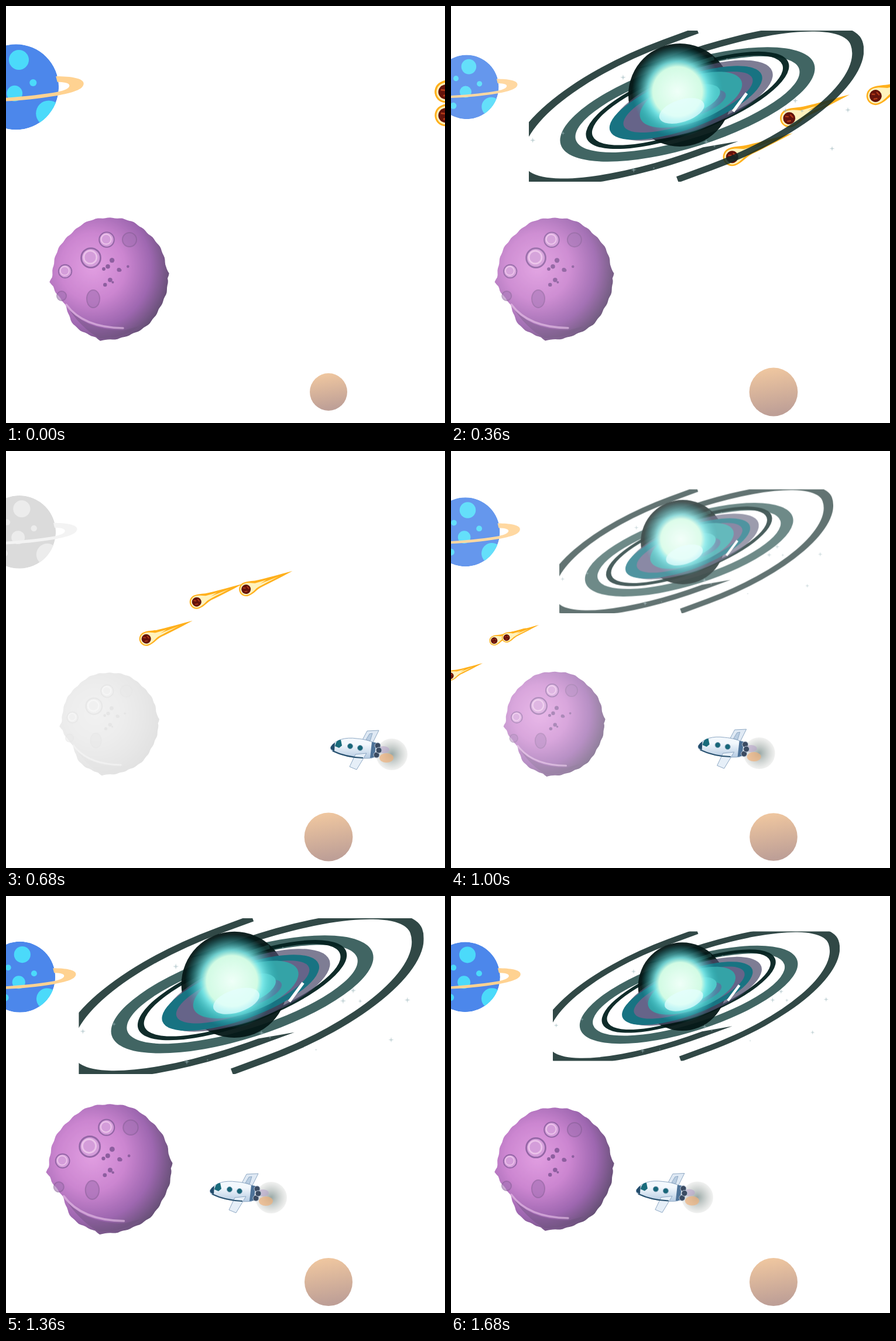
Animation of 750x712 px, one loop 1720 ms. Source, as an HTML page:

```html
<!DOCTYPE html>
<html lang="en">
<head>
<meta charset="utf-8">
<title>Space</title>
<style>
  html, body { margin: 0; width: 100%; height: 100%; overflow: hidden; background: #fff; }
  svg { display: block; width: 750px; height: 712px; }
</style>
</head>
<body>
<svg viewBox="0 0 750 712">
  <defs>
    <radialGradient id="violet" cx=".36" cy=".4" r=".68">
      <stop offset="0" stop-color="#d982d9"/><stop offset=".4" stop-color="#bd62c3"/>
      <stop offset=".72" stop-color="#813a99"/><stop offset="1" stop-color="#301844"/>
    </radialGradient>
    <linearGradient id="sand" x1="0" y1="0" x2=".15" y2="1">
      <stop offset="0" stop-color="#eaa35c"/><stop offset="1" stop-color="#8f5a4b"/>
    </linearGradient>
    <radialGradient id="glow">
      <stop offset="0" stop-color="#effff8"/><stop offset=".54" stop-color="#d2fbe4"/>
      <stop offset=".66" stop-color="#7fecec" stop-opacity=".85"/>
      <stop offset="1" stop-color="#29b5bd" stop-opacity="0"/>
    </radialGradient>
    <radialGradient id="smoke">
      <stop offset="0" stop-color="#536e6b" stop-opacity=".6"/>
      <stop offset="1" stop-color="#8a8f88" stop-opacity=".12"/>
    </radialGradient>
    <linearGradient id="hull" x1="0" y1="0" x2="0" y2="1">
      <stop offset=".3" stop-color="#f3f8fd"/><stop offset="1" stop-color="#b5cbe2"/>
    </linearGradient>
    <clipPath id="globe"><circle r="60"/></clipPath>
    <clipPath id="crop"><rect x="-286" y="-129" width="572" height="258"/></clipPath>
    <g id="comet" transform="rotate(-21.4)">
      <path fill="#ffb01c" d="M85 0C60 3 40 5 26 6C16 7 10 12 0 12A12 12 0 0 1 0-12C10-12 16-8 26-7C40-5 60-3 85 0Z"/>
      <path fill="#fff2bd" d="M60 0C40 2 24 3 17 5C10 8 6 10 0 10A10 10 0 0 1 0-10C6-10 12-7 18-4L38-2L26 0Z"/>
      <circle r="8" fill="#64130b"/>
      <path fill="none" stroke="#b23a18" stroke-width="1.8" d="M-4-4L0-2M3-4L5 1M-4 3L1 4"/>
    </g>
    <g id="crater">
      <circle r="15" fill="#c880cf" stroke="#74398c" stroke-width="2.5"/>
      <circle cx="-1" cy="-1" r="10" fill="none" stroke="#e6b0e4" stroke-width="2.5"/>
    </g>
  </defs>

  <g id="blue">
    <g clip-path="url(#globe)">
      <circle r="60" fill="#2f74e8"/>
      <g fill="#2ed5fa">
        <circle cx="4" cy="-38" r="14"/><circle cx="24" cy="-6" r="5"/><circle cx="-2" cy="9" r="11"/>
        <circle cx="-20" cy="-16" r="5"/><circle cx="46" cy="37" r="18"/><circle cx="-25" cy="35" r="6"/>
      </g>
    </g>
    <path fill="#ffcb80" d="M56-15C78-15 95-12 95-5C95 4 78 8 58 12C20 18-5 20-45 21V17C0 15 35 11 58 7C68 5 75 2 75-2C75-6 66-7 58-7Z"/>
  </g>

  <g id="purple">
    <path id="rock" fill="url(#violet)"/>
    <path fill="#3c1d51" opacity=".4" d="M-74 46Q-45 88 23 89L50 82Q20 104-18 102Q-50 84-74 46Z"/>
    <path fill="none" stroke="#e6b5e6" stroke-width="3.5" stroke-linecap="round" opacity=".6" d="M-74 45Q-45 84 23 85"/>
    <g fill="#8a479f" stroke="#633079" stroke-width="2" opacity=".6">
      <circle cx="34" cy="-66" r="12"/><ellipse cx="-28" cy="35" rx="11" ry="15"/><circle cx="-82" cy="30" r="8"/>
    </g>
    <use href="#crater" transform="translate(-32 -35) scale(1.1)"/>
    <use href="#crater" transform="translate(-5 -66) scale(.85)"/>
    <use href="#crater" transform="translate(-76 -12) scale(.75)"/>
    <g id="pits" fill="#6b2f83"></g>
  </g>

  <circle id="brown" r="41" fill="url(#sand)"/>
  <g id="comets"></g>

  <g id="galaxy">
    <g clip-path="url(#crop)">
      <g id="rings" fill-rule="evenodd"></g>
      <circle cx="-28" cy="-19" r="88" fill="#051817" opacity=".95"/>
      <path d="M-105-8L-20-66L30-82M-70 48Q0 50 52 12" stroke="#245451" stroke-width="7" fill="none" opacity=".5"/>
      <g transform="translate(-14 -7) rotate(-20.2)">
        <ellipse cx="8" rx="145" ry="50" fill="#4d4b6b" opacity=".72"/>
        <ellipse cx="-4" rx="138" ry="44" fill="#187382"/>
        <ellipse rx="117" ry="35" fill="#666489"/>
        <ellipse cx="6" cy="-2" rx="92" ry="38" fill="#34a3a7"/>
        <ellipse cx="15" cy="9" rx="50" ry="18" fill="#606c9a" opacity=".75"/>
        <ellipse cx="8" cy="-1" rx="50" ry="22" fill="#52c9c8"/>
      </g>
      <path d="M63 9L86-22" stroke="#fff" stroke-width="5"/>
      <circle cx="-32" cy="-25" r="78" fill="url(#glow)"/>
      <ellipse cx="-26" rx="40" ry="19" fill="#e4ffff" opacity=".7" transform="rotate(-18)"/>
    </g>
    <g id="stars" fill="#9fb9be" opacity=".65"></g>
  </g>

  <g id="rocket">
    <circle cx="104" cy="13" r="27" fill="url(#smoke)"/>
    <ellipse cx="95" cy="19" rx="12" ry="8" fill="#efb27c" opacity=".7"/>
    <ellipse cx="90" cy="5" rx="10" ry="6" fill="#b9a5cc" opacity=".6"/>
    <g stroke="#8fa9c4">
      <path fill="#dfe9f4" d="M54-12L62-27L82-28L71-6Z"/>
      <path fill="#b9cde2" d="M60-12L66-22L71-23L67-10Z"/>
      <path fill="url(#hull)" d="M0 0C8-12 24-17 45-14C58-13 70-9 78-5L71 19C55 22 20 17 4 8C0 6-1 3 0 0Z"/>
      <path fill="#e6eff8" d="M42 13L61 11L44 39L32 34Z"/>
    </g>
    <path fill="#234d6c" d="M0 0Q3-5 7-7L6 7Q-2 5 0 0Z"/>
    <path fill="#196b7b" d="M7-1Q9-12 17-12L19-2L14 2Z"/>
    <path fill="none" stroke="#27506e" stroke-width="2" d="M3 7Q26 18 55 19"/>
    <path fill="#4d7298" d="M70-8L77-7L75 18L67 19Z"/>
    <g fill="#3b4b62" stroke="#bac8d8"><circle cx="80" cy="-2" r="5"/><circle cx="78" cy="14" r="5"/><circle cx="82" cy="6" r="5"/></g>
    <g fill="#176678" stroke="#7e9fb8"><circle cx="33" cy="-1" r="4.5"/><circle cx="50" cy="2" r="4.5"/></g>
  </g>
</svg>

<script>
const LOOP = 1720, STEP = 40, BEAT = 840;
const $ = id => document.getElementById(id);
const clamp = v => Math.max(0, Math.min(1, v));
const bump = (t, peak, width) => Math.exp(-(((t - peak) / width) ** 2));
const wobble = (t, amp, decay, period) => amp * Math.exp(-t / decay) * Math.cos(2 * Math.PI * t / period);

let seed = 11;
const rand = (lo, hi) => {
  seed = seed * 16807 % 2147483647;
  return lo + (hi - lo) * seed / 2147483647;
};

function add(parent, tag, attrs) {
  const el = document.createElementNS('http://www.w3.org/2000/svg', tag);
  for (const k in attrs) el.setAttribute(k, attrs[k]);
  return parent.appendChild(el);
}

// Rough rock outline: rippled, flattened at the lower left, with three small peaks.
function rockPath() {
  const pts = [];
  for (let a = 0; a < 6.28; a += .04) {
    let r = 99 + 5 * Math.sin(a) ** 2 + .8 * Math.sin(9 * a) + .6 * Math.sin(31 * a) - 11 * bump(a, 2.6, .32);
    for (const peak of [1.73, 3.08, 6.21]) r += 4 * bump(a, peak, .05);
    pts.push([r * Math.cos(a), r * Math.sin(a)].map(v => v.toFixed(1)));
  }
  return `M${pts.join('L')}Z`;
}

const ellipse = (a, b) => `M${-a} 0A${a} ${b} 0 1 1 ${a} 0A${a} ${b} 0 1 1 ${-a} 0Z`;
const ring = (a, b, da, db) => ellipse(a, b) + ellipse(a - da, b - db);

// Spiral arm: a narrow upper half that opens into a wide lower half.
function arm(a, top, low, tip, side) {
  const s = -60, i = a - tip, t = top - side, l = low - side;
  return `M${s} ${-top}H0A${a} ${top} 0 0 1 ${a} 0A${a} ${low} 0 0 1 0 ${low}H${s}`
       + `V${l}H0A${i} ${l} 0 0 0 ${i} 0A${i} ${t} 0 0 0 0 ${-t}Z`;
}

function addRing(d, fill, opacity, tilt, y) {
  add($('rings'), 'path', { d, fill, opacity, transform: `translate(-15 ${y}) rotate(${tilt})` });
}

$('rock').setAttribute('d', rockPath());
for (let i = 0; i < 9; i++)
  add($('pits'), 'circle', { cx: rand(-10, 40), cy: rand(-45, 20), r: rand(2, 5) });

for (const turn of [0, 180])
  addRing(arm(318, 88, 119, 21, 11), '#0d2826', .85, turn - 20.2, -2);
addRing(ring(227, 73, 27, 15), '#123f3d', .8, -17.6, -3);
addRing(ring(184, 56, 11, 6), '#04211f', .95, -20.5, -10);

for (let i = 0; i < 14; i++) {
  const r = rand(2, 5), q = r / 5;
  add($('stars'), 'path', {
    d: `M0 ${-r}L${q} ${-q}L${r} 0L${q} ${q}L0 ${r}L${-q} ${q}L${-r} 0L${-q} ${-q}Z`,
    transform: `translate(${rand(-280, 260)} ${rand(-85, 130)})`
  });
}

const comets = [
  { delay: 140, speed: .7875, y: 343 },
  { delay: 334, speed: .985, y: 343.5 },
  { delay: 0, speed: .752, y: 383.5 }
];
for (const c of comets) {
  c.el = add($('comets'), 'g', {});
  add(c.el, 'use', { href: '#comet' });
}

function place(el, x, y, scale = 1, opacity = 1, sat = 1) {
  el.setAttribute('transform', `translate(${x} ${y}) scale(${scale})`);
  el.setAttribute('opacity', opacity);
  el.style.filter = sat < 1 ? `saturate(${sat})` : 'none';
}

function draw(t) {
  const sat = 1 - bump(t, 680, 150);

  const swell = wobble(t, 13, 400, 680);
  place($('blue'), 24 - swell * .53, 138.3, 1 + swell / 60, .86 - .62 * bump(t, 680, 250), sat);

  const rock = 1 + .14 * bump(t, 1220, 150) - .28 * bump(t, 840, 220);
  place($('purple'), 177, 465, rock, .77 - .68 * bump(t, 740, 240), sat);

  place($('brown'), 551, 659, 1 - wobble(t, .22, 250, 500), .58);

  for (const c of comets) {
    const x = 751 - c.speed * Math.max(0, t - c.delay);
    place(c.el, x, c.y - .262 * x, Math.min(1.55, 1.646 - .00095 * t));
  }

  // The galaxy beats twice and fades out after the first beat only.
  const first = t < BEAT, p = first ? t : t - BEAT, past = p - 440;
  const width = 614 - (past < 0 ? -.522 : .31) * past;
  const fade = clamp(p / 210) * (first ? clamp((640 - p) / 160) : 1);
  place($('galaxy'), 419, 171, (past < 0 ? 614 + .522 * past : width) / 572, fade);

  const glide = Math.exp(-(t - 680) / 480);
  place($('rocket'), 283 + 272 * glide, 501 + 4 * glide);
}

const start = performance.now();
function tick() {
  const t = (performance.now() - start) % LOOP;
  draw(Math.floor(t / STEP) * STEP);
  requestAnimationFrame(tick);
}
tick();
</script>
</body>
</html>
```
